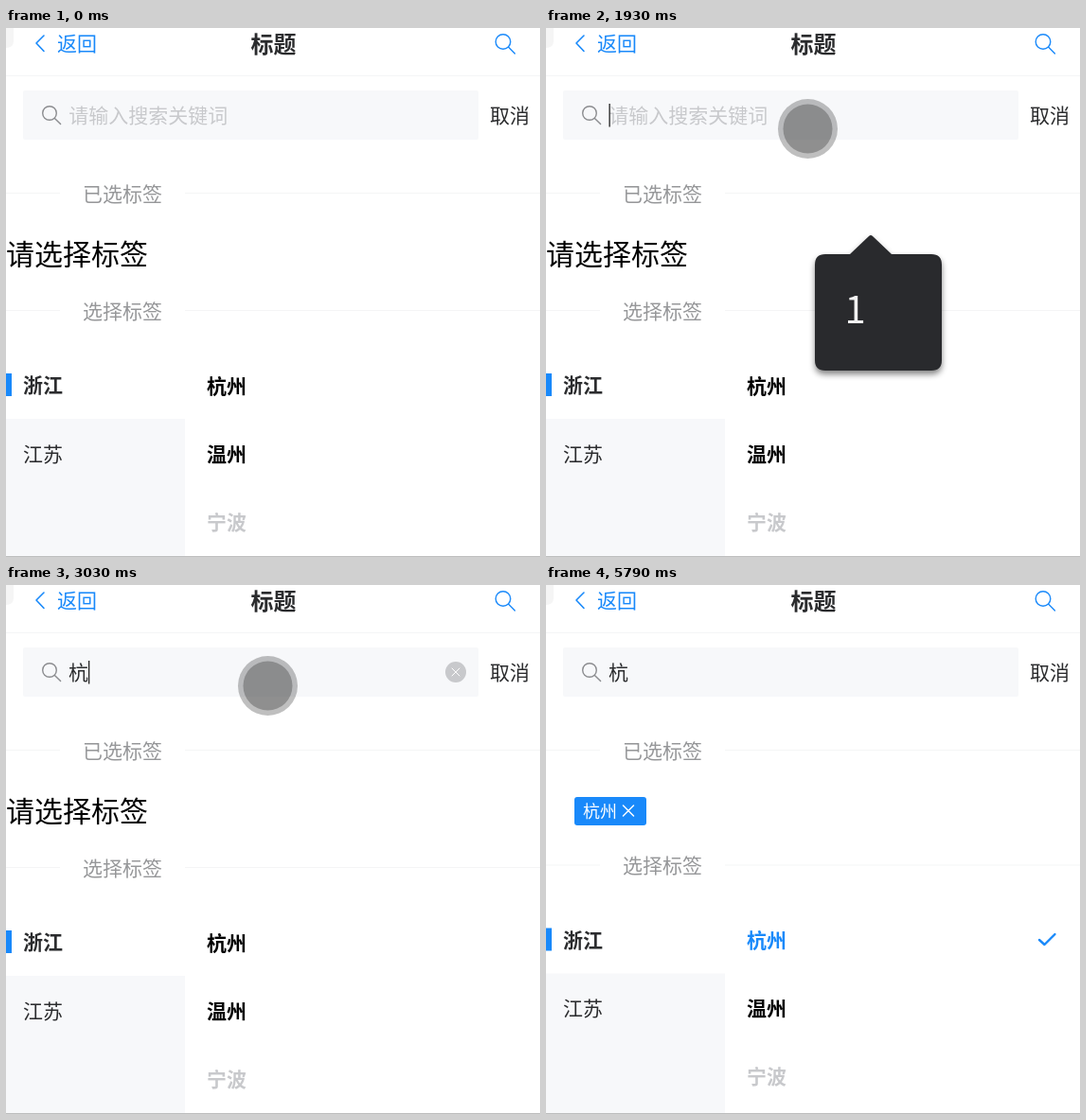
Recreate the animation shown at these times as an HTML page. Size 564 px wide and 559 px high, loop 6.55 s.

```html
<!DOCTYPE html>
<html lang="zh-CN">
<head>
<meta charset="utf-8">
<title>标签选择</title>
<style>
  html, body { margin: 0; width: 100%; height: 100%; overflow: hidden; background: #fff; }
  svg { display: block; width: 564px; height: 559px; }
  text { font-family: "Noto Sans CJK SC", "Noto Sans CJK", sans-serif; white-space: pre; }
  .latin { font-family: "Liberation Sans", Arial, sans-serif; }
  .bold { font-weight: 700; }
  .line { fill: none; stroke-linecap: round; stroke-linejoin: round; }
</style>
</head>
<body>
<svg id="stage" viewBox="0 0 564 559"></svg>
<script>
const LOOP = 6550, BLUE = '#1989fa', PALE = '#f7f8fa', GREY = '#c8c9cc', INK = '#2b2c2e';
const stage = document.getElementById('stage');

// Text placed by its left edge and the vertical centre of its characters
const text = (x, cy, size, str, fill, cls = '') =>
  `<text x="${x}" y="${cy + size * 0.38}" font-size="${size}" fill="${fill}" class="${cls}">${str}</text>`;
const rect = (x, y, w, h, fill, r = 0) =>
  `<rect x="${x}" y="${y}" width="${w}" height="${h}" rx="${r}" fill="${fill}"/>`;
const line = (d, color, width) =>
  `<path class="line" d="${d}" stroke="${color}" stroke-width="${width}"/>`;
const group = (id, body) => `<g id="${id}">${body}</g>`;
const lens = (x, y, r, color) =>
  line(`M${x - r} ${y}a${r} ${r} 0 1 1 ${2 * r} 0a${r} ${r} 0 1 1 ${-2 * r} 0M${x + r * 0.71} ${y + r * 0.71}l${r * 0.88} ${r * 0.88}`, color, 1.4);
const cross = (x, y, r, width) =>
  line(`M${x - r} ${y - r}l${2 * r} ${2 * r}m0 ${-2 * r}l${-2 * r} ${2 * r}`, '#fff', width);
const divider = (y, label) =>
  rect(0, y - 1, 57, 1, '#f4f5f6') + rect(189, y - 1, 375, 1, '#f4f5f6') + text(81, y, 21, label, '#969799');

const header =
  '<path d="M0 0H8V14Q8 21 0 21Z" fill="#f5f5f5"/>' +
  line('M40 8L32 16L40 24.5', BLUE, 1.6) + text(54, 16.5, 21, '返回', BLUE) +
  text(258.5, 17, 24, '标题', INK, 'bold') + lens(525, 14.5, 7.8, BLUE) + rect(0, 50, 564, 1, '#f4f5f6');

const search =
  rect(18, 66, 481, 52, PALE, 2) + lens(46, 90, 7.3, '#8b8c8f') +
  text(511, 92, 21, '取消', INK) +
  group('hint', text(66.3, 92, 21, '请输入搜索关键词', GREY)) +
  group('query', text(66, 92, 21, '杭', INK)) +
  group('clear', `<circle cx="475" cy="92" r="11" fill="${GREY}"/>` + cross(475, 92, 4, 1)) +
  group('caret', rect(0, 80, 1.3, 24.5, '#222'));

const chosen = divider(175, '已选标签') +
  group('none', text(0, 239, 30, '请选择标签', '#000')) +
  group('tag', rect(30, 224, 76, 30, BLUE, 3) + text(39, 239, 18, '杭州', '#fff') + cross(87, 238.5, 5.5, 1.5));

const list = group('list', divider(299, '选择标签') +
  rect(0, 365, 6, 24, BLUE) + rect(0, 413, 189, 160, PALE) +
  text(18, 377.5, 21, '浙江', INK, 'bold') + text(18, 450, 21, '江苏', INK) +
  group('city', text(212, 378, 21, '杭州', 'currentColor', 'bold')) +
  text(212, 450, 21, '温州', '#000', 'bold') + text(212, 522, 21, '宁波', GREY, 'bold') +
  group('check', line('M521 377.5L526.5 382.5L537.5 371.5', BLUE, 2.4))) +
  rect(0, 558, 564, 1, '#bdbdbd');

const pointer = group('pointer',
  '<circle r="31.5" fill="#000" fill-opacity=".25"/><circle r="26" fill="#000" fill-opacity=".25"/>');

const bubble = group('bubble',
  `<path d="M295 239H321L341 220Q343 218 345 220L365 239H407Q418 239 418 250V351Q418 362 407 362H295Q284 362 284 351V250Q284 239 295 239Z"
    fill="#292a2d" style="filter:drop-shadow(0 4px 3px rgba(0,0,0,.48))"/>` + text(315.5, 297, 40, '1', '#f2f2f2'));

const ime = group('ime', rect(120, 204, 444, 158, '#d6d6d6') +
  '<text id="typed" class="latin" x="156.5" y="255" font-size="46.8"/>' +
  group('imeCaret', rect(0, 212, 1.2, 52, '#333')) + group('options', ''));

stage.innerHTML = header + search + chosen + list + pointer + bubble + ime;

const el = id => document.getElementById(id);
const show = (id, on) => { el(id).style.display = on ? '' : 'none'; };
const within = (t, a, b) => t >= a && t < b;

const OPTIONS = ['好和会还', '哈蛤铪虾', '韩汉喊含', '杭行航夯'];

function drawIme(t) {
  const on = within(t, 2140, 2870);
  show('ime', on);
  if (!on) return;
  const n = Math.min(3, Math.floor((t - 2140) / 80));
  el('typed').textContent = 'hang'.slice(0, n + 1);
  el('imeCaret').setAttribute('transform', `translate(${157 + 26 * (n + 1)})`);
  el('options').innerHTML = [...OPTIONS[n]].map((c, i) => {
    const x = 158 + 121.5 * i, color = i ? '#000' : '#0f83e6';
    return text(x, 308.5, 39, i + 1, color) + text(x + 30.5, 311.2, 48.5, c, color);
  }).join('');
}

const bezier = (points, s) => [0, 1].map(k => {
  const [a, b, c, d] = points.map(p => p[k]), u = 1 - s;
  return u * u * u * a + 3 * u * u * s * b + 3 * u * s * s * c + s * s * s * d;
});
const ENTER = [[529.5, 517.5], [450, 310], [395, 140], [280.5, 106.5]];
const LEAVE = [[277.5, 106.5], [385, 145], [440, 300], [516.5, 501.5]];

function pointerAt(t) {
  if (t < 690) return bezier(ENTER, 1 - (1 - Math.floor((t - 90) / 600 * 13) / 13) ** 2.4);
  if (t < 820) return ENTER[3];
  if (t < 5340) return [276.5, 106.5];
  return bezier(LEAVE, (Math.floor((t - 5340) / 450 * 11) / 10) ** 2);
}

function draw(t) {
  const typed = t >= 2870, picked = t >= 4440;
  show('hint', !typed);
  show('query', typed);
  show('clear', typed && !picked);
  show('caret', within(t, 820, 1440) || within(t, 1930, 2140) || within(t, 2870, 3360) || within(t, 3850, 4360));
  el('caret').setAttribute('transform', `translate(${typed ? 87 : 66.5})`);

  show('none', !picked);
  show('tag', picked);
  show('check', picked);
  el('city').style.color = picked ? BLUE : '#000';
  el('list').setAttribute('transform', `translate(0 ${picked ? -2.5 : 0})`);

  show('pointer', within(t, 90, 5790));
  if (within(t, 90, 5790)) el('pointer').setAttribute('transform', `translate(${pointerAt(t)})`);

  show('bubble', within(t, 820, 3030));
  el('bubble').style.opacity = t < 950 ? (Math.floor((t - 820) / 65) + 1) / 3
    : t < 2870 ? 1 : 1 - (Math.floor((t - 2870) / 40) + 1) / 5;
  drawIme(t);
}

const start = performance.now();
function tick() {
  draw((performance.now() - start) % LOOP);
  requestAnimationFrame(tick);
}
tick();
</script>
</body>
</html>
```
